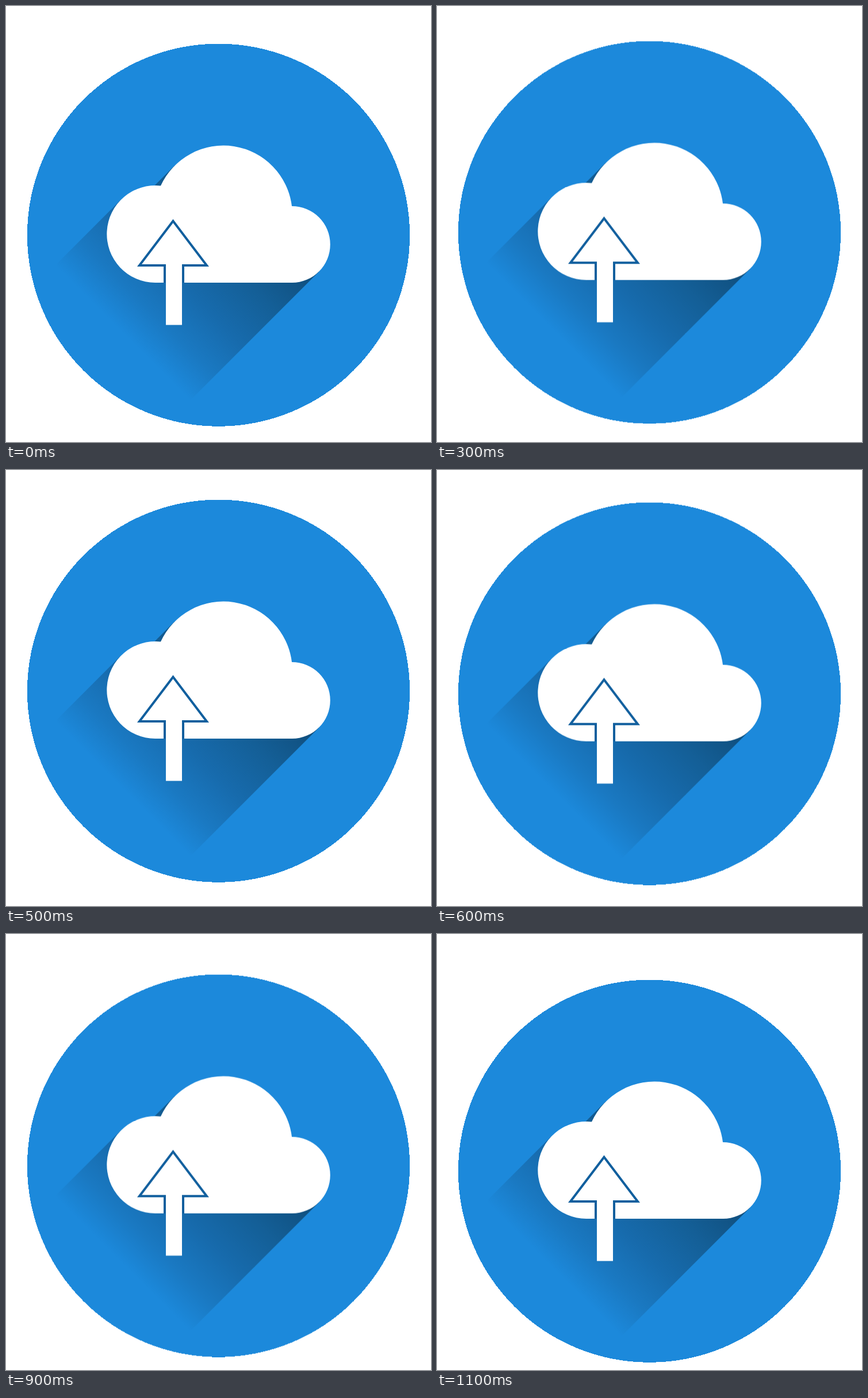
Write an HTML page that moves like this. It is 739 by 758 pixels and loops after 1200 ms.

```html
<!DOCTYPE html>
<html lang="en">
<head>
<meta charset="utf-8">
<title>Cloud upload</title>
<style>
  html, body { margin: 0; width: 100%; height: 100%; overflow: hidden; background: #fff; }
  svg { display: block; width: 739px; height: 758px; }

  /* Stepped bobbing, 12 ticks of 100 ms; the small lead keeps ticks on time */
  #badge { --step: 4.667px; animation: bob 1200ms -1ms infinite; }
  @keyframes bob {
    0% { transform: translateY(0); animation-timing-function: step-end; }
    8.3333% { transform: translateY(var(--step)); animation-timing-function: steps(4, end); }
    41.6666% { transform: translateY(calc(var(--step) * -3)); animation-timing-function: steps(6, end); }
    91.6666% { transform: translateY(calc(var(--step) * 3)); animation-timing-function: step-end; }
    100% { transform: translateY(calc(var(--step) * 3)); }
  }
</style>
</head>
<body>
<svg viewBox="0 0 739 758">
  <defs>
    <linearGradient id="shade" gradientUnits="userSpaceOnUse" x1="545" y1="461" x2="320.5" y2="685.5">
      <stop offset=".05" stop-color="#104f7e"/>
      <stop offset=".32" stop-color="#145f97"/>
      <stop offset=".59" stop-color="#176bad"/>
      <stop offset=".81" stop-color="#1a79c2"/>
      <stop offset="1" stop-color="#1c89db"/>
    </linearGradient>
  </defs>
  <g id="badge">
    <circle cx="369.5" cy="398.2" r="332.6" fill="#1c89db" shape-rendering="crispEdges"/>
    <path fill="url(#shade)" d="M199.7 336.7L85.5 450.9 320.5 685.5 544.5 461.5ZM293.2 277.2L240 330.4H300Z"/>
    <path fill="#fff" d="M259.5 481A84.5 84.5 0 1 1 269 312.5A119.9 119.9 0 0 1 497 348A66.5 66.5 0 0 1 497.5 481Z"/>
    <path fill="#fff" stroke="#115f9e" stroke-width="4" d="M276 481V451H232L290.5 373.8 349 451H308V481"/>
    <path fill="#fff" d="M278 449H306V554.5H278Z"/>
  </g>
</svg>
</body>
</html>
```
